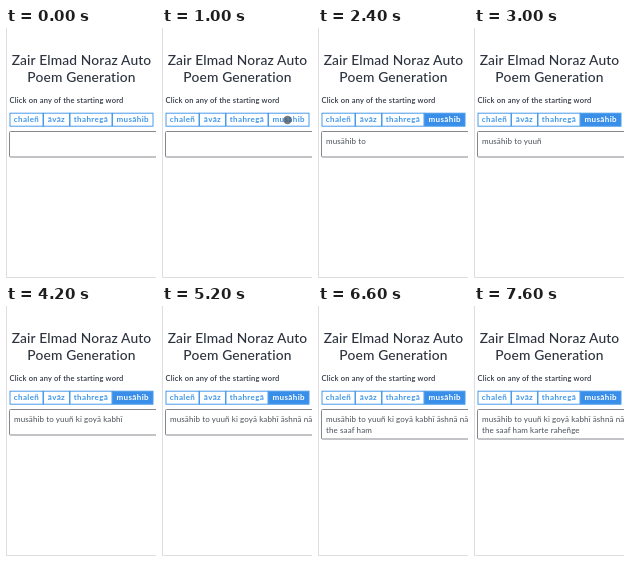
An HTML page for the animation above (8 s loop, 150 by 250 pixels).

```html
<!DOCTYPE html>
<html lang="en">
<head>
<meta charset="utf-8">
<title>Poem Generation</title>
<style>
  html, body { margin: 0; width: 100%; height: 100%; overflow: hidden; background: #fff; }
  svg { display: block; font-family: Lato, "Open Sans", sans-serif; }
  .title { font-size: 13.8px; font-weight: 500; fill: #2c333f; text-anchor: middle; letter-spacing: .15px; }
  .hint { font-size: 7.5px; font-weight: 600; fill: #2c333f; letter-spacing: .2px; }
  .button rect { fill: #fff; stroke: #4a9bea; }
  .button text { font-size: 8px; font-weight: 700; fill: #3f97ea; text-anchor: middle; letter-spacing: .38px; }
  .poem { font-size: 8px; fill: #4a4f58; letter-spacing: .1px; }
</style>
</head>
<body>
<svg width="150" height="250" viewBox="0 0 150 250">
  <path d="M.5 0V250M0 249.5H150" stroke="#dcdee1" fill="none"/>
  <text class="title" x="75.5" y="36.7">Zair Elmad Noraz Auto</text>
  <text class="title" x="75.5" y="54">Poem Generation</text>
  <text class="hint" x="3.5" y="75">Click on any of the starting word</text>
  <g id="buttons"></g>
  <rect id="box" x="3.5" y="103.5" width="160" rx="1" fill="none" stroke="#85888d"/>
  <text class="poem" id="line1" x="8" y="116"></text>
  <text class="poem" id="line2" x="8" y="127"></text>
  <circle id="touch" fill="#46505c"/>
</svg>
<script>
const LOOP = 8000;
const $ = id => document.getElementById(id);
const clamp = v => Math.min(1, Math.max(0, v));
const mix = (a, b, k) => a + (b - a) * k;

const labels = [["chaleñ", 4, 37], ["āvāz", 37.5, 63.5], ["thahregā", 64, 106], ["musāhib", 106.5, 147]];
$("buttons").innerHTML = labels.map(([word, left, right]) =>
  `<g class="button"><rect x="${left}" y="85.2" width="${right - left}" height="13"/>` +
  `<text x="${(left + right) / 2}" y="94.4">${word}</text></g>`).join("");
const [chosenRect, chosenText] = $("buttons").lastChild.children;

// Each word appears at its own time, in ms.
const line1 = [[1600, "musāhib"], [2400, "to"], [2600, "yuuñ"], [3200, "ki"], [3600, "goyā"],
  [4200, "kabhī"], [4600, "āshnā"], [5200, "nā"]];
const line2 = [[5600, "the"], [6200, "saaf"], [6600, "ham"], [7200, "karte"], [7600, "raheñge"]];
const typed = (words, t) => words.filter(([at]) => t >= at).map(([, word]) => word).join(" ");

function draw(now) {
  const t = now % LOOP;
  $("line1").textContent = typed(line1, t);
  $("line2").textContent = typed(line2, t);
  $("box").setAttribute("height", t < 5600 ? 25.5 : 29.5);

  const fill = clamp((t - 1300) / 300);
  chosenRect.style.fill = `rgb(${mix(255, 56, fill)},${mix(255, 142, fill)},${mix(255, 232, fill)})`;
  chosenText.style.fill = `rgb(${mix(63, 255, fill)},${mix(151, 255, fill)},${mix(234, 255, fill)})`;

  // The touch dot presses, drifts left, then grows and fades away.
  const drift = clamp((t - 1200) / 500), leave = clamp((t - 1850) / 550);
  const touch = $("touch");
  touch.setAttribute("cx", mix(mix(125.5, 122, drift), 125, leave));
  touch.setAttribute("cy", mix(92, 85, leave));
  touch.setAttribute("r", mix(4.2, 9, leave));
  touch.setAttribute("opacity", t < 800 ? 0 : .75 * (1 - leave));
  requestAnimationFrame(() => draw(performance.now()));
}
draw(performance.now());
</script>
</body>
</html>
```
